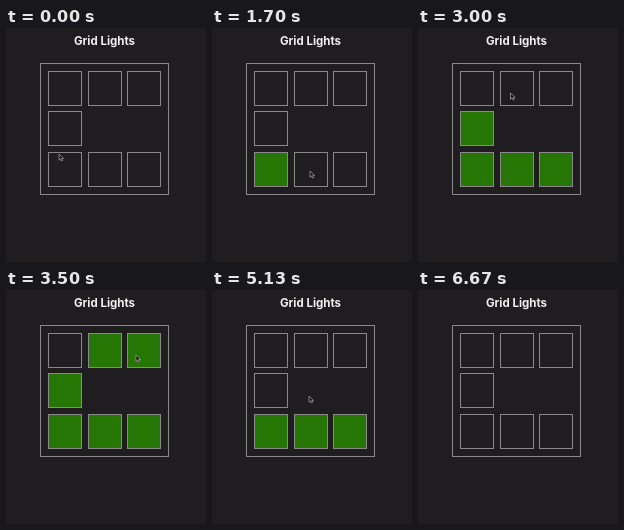
These frames come from a looping animation (200 px wide and 234 px high, 7760 ms). An HTML page:

```html
<!DOCTYPE html>
<html lang="en">
<head>
<meta charset="utf-8">
<title>Grid Lights</title>
<style>
  html, body { margin: 0; width: 100%; height: 100%; overflow: hidden; background: #201d20; }
  svg { display: block; width: 100%; height: 100%; }
  text { font: 700 11.5px Inter, "Liberation Sans", sans-serif; fill: #f0f0f0; text-anchor: middle; }
  rect { fill: none; stroke: #8a888a; }
  .lit { fill: #267605; }
  #cursor { fill: #151315; stroke: #aaa; stroke-width: .7; stroke-linejoin: round; }
</style>
</head>
<body>
<svg viewBox="0 0 200 234">
  <text x="98.5" y="16.7">Grid Lights</text>
  <rect x="34.5" y="35.5" width="128" height="131"/>
  <g id="grid"></g>
  <path id="cursor" d="M0 0V6.2L1.5 4.9L2.5 7L3.6 6.5L2.7 4.5H4.6Z"/>
</svg>
<script>
const LOOP = 7760;
const LEFT = 42.5, TOP = 43.5, PITCH_X = 39.5, PITCH_Y = 40.4;
const DWELL = 165;      // rest at every stop, ending in a click where there is one
const OFF_STEP = 300;   // lights go out one by one, last lit first
const CURSOR_GONE = 6660;

const stop = (arrive, x, y) => ({ arrive, leave: arrive + DWELL, x, y });

// Each click lights the cell under the cursor.
const clicks = [
  stop(1165, 66.5, 143), stop(1540, 98, 143), stop(2035, 131, 141), stop(2390, 68, 104),
  stop(2965, 92.5, 65), stop(3300, 130, 65), stop(3765, 73, 69)
];
const stops = [
  stop(-135, 53, 126), stop(400, 59, 138), stop(700, 80.5, 143.5),
  ...clicks,
  { arrive: 4230, leave: 6540, x: 97, y: 106 }, stop(6630, 135, 2)
];

const cursor = document.getElementById("cursor");
const lastClick = clicks[clicks.length - 1].leave;

const cells = clicks.map(({ x, y, leave }, i) => {
  const column = Math.floor((x - LEFT) / PITCH_X), row = Math.floor((y - TOP) / PITCH_Y);
  const rect = document.createElementNS("http://www.w3.org/2000/svg", "rect");
  const attributes = {
    x: LEFT + Math.round(column * PITCH_X),
    y: TOP + Math.round(row * PITCH_Y),
    width: 33, height: 34
  };
  for (const name in attributes) rect.setAttribute(name, attributes[name]);
  document.getElementById("grid").append(rect);
  return { rect, on: leave, off: lastClick + (clicks.length - i) * OFF_STEP };
});

const ease = p => p < .5 ? 8 * p ** 4 : 1 - 8 * (1 - p) ** 4;

function cursorAt(time) {
  const i = stops.findLastIndex(s => s.arrive <= time);
  const from = stops[i], to = stops[i + 1] ?? from;
  const p = time <= from.leave ? 0 : ease((time - from.leave) / (to.arrive - from.leave));
  return [from.x + (to.x - from.x) * p, from.y + (to.y - from.y) * p];
}

function draw(time) {
  for (const { rect, on, off } of cells) rect.classList.toggle("lit", time >= on && time < off);
  cursor.setAttribute("transform", `translate(${cursorAt(time)})`);
  cursor.style.display = time < CURSOR_GONE ? "" : "none";
}

let start;
function tick(now) {
  start ??= now;
  draw((now - start) % LOOP);
  requestAnimationFrame(tick);
}
draw(0);
requestAnimationFrame(tick);
</script>
</body>
</html>
```
